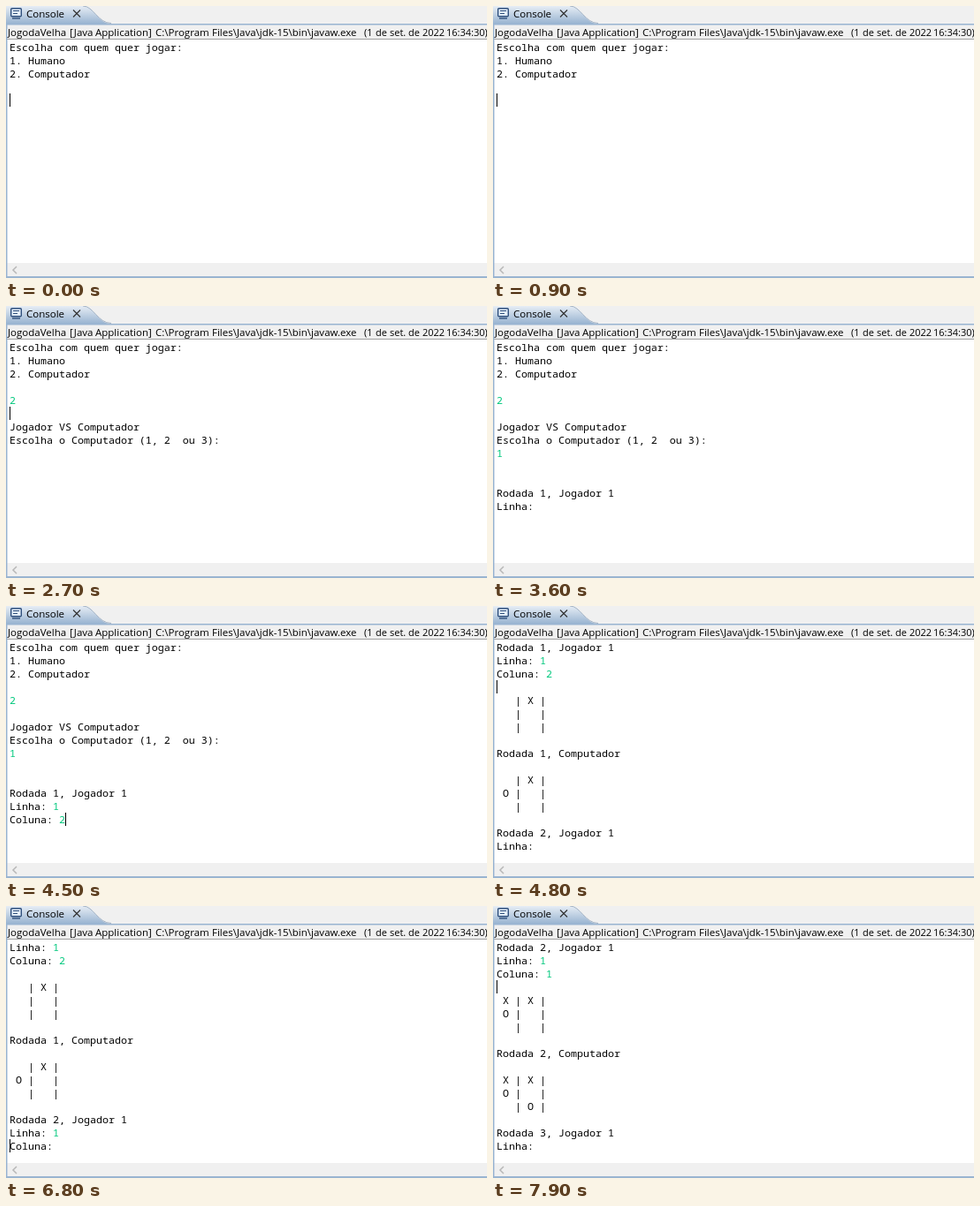
Write an HTML page that moves like this. It is 544 px wide and 308 px high and loops after 8000 ms.

```html
<!DOCTYPE html>
<html lang="pt-BR">
<head>
<meta charset="utf-8">
<title>Console</title>
<style>
  html, body { margin: 0; width: 100%; height: 100%; overflow: hidden; background: #fff; }
  svg { display: block; width: 544px; height: 308px; }
  text { white-space: pre; fill: #000; }
  .ui { font-family: "Open Sans", "Noto Sans", sans-serif; font-size: 11.5px; }
  .date { font-size: 11px; }
  .log { font-family: "Noto Sans Mono", "DejaVu Sans Mono", monospace; font-size: 11.667px; }
  .typed { fill: #00c87d; }
</style>
</head>
<body>
<svg viewBox="0 0 544 308" xmlns="http://www.w3.org/2000/svg">
  <defs>
    <linearGradient id="tab" x1="0" y1="0" x2="0" y2="1">
      <stop offset="0" stop-color="#e6edf5"/>
      <stop offset="1" stop-color="#99b4d1"/>
    </linearGradient>
  </defs>

  <rect width="544" height="308" fill="#fff"/>
  <rect width="544" height="38" fill="#f0f0f0"/>
  <path d="M0 0H87C99 0 104 20 119 20H0Z" fill="url(#tab)"/>
  <path d="M87 0C99 0 104 19.5 119 19.5" fill="none" stroke="#a3b3c6"/>
  <rect y="20" width="544" height="1.5" fill="#99b4d1"/>
  <rect y="37" width="544" height="1" fill="#a0a0a0"/>

  <g stroke="#2f4f7c" fill="none">
    <rect x="5.7" y="2.7" width="11.6" height="9.1" rx="1" fill="#e3eefa" stroke-width="1.4"/>
    <path d="M8 5.5H15M8 8.5H13"/>
    <path d="M7 14H16" stroke-width="1.4"/>
  </g>
  <text class="ui" x="23" y="13">Console</text>
  <path d="M76 4.5L84 12.5M84 4.5L76 12.5" stroke="#333" stroke-width="1.2"/>

  <text class="ui" y="34" id="title"></text>

  <g id="log"></g>
  <rect id="caret" width="1" height="15" fill="#000"/>

  <rect y="291" width="544" height="15" fill="#f0f0f0"/>
  <path d="M12 295L8 299L12 303" fill="none" stroke="#b8b8b8" stroke-width="1.5"/>
  <rect y="21" width="1.5" height="287" fill="#99b4d1"/>
  <rect y="306" width="544" height="2" fill="#99b4d1"/>
</svg>

<script>
const NS = 'http://www.w3.org/2000/svg';
const LOOP = 8000, ROWS = 16, LEFT = 4, CHAR = 7, LINE = 15, BASE = 51;

const byId = id => document.getElementById(id);
function add(parent, tag, attrs = {}, text = '') {
  const el = document.createElementNS(NS, tag);
  for (const key in attrs) el.setAttribute(key, attrs[key]);
  el.textContent = text;
  return parent.appendChild(el);
}

const words = (list, cls) => list.forEach(([x, word]) =>
  add(byId('title'), 'tspan', { x, class: cls }, word));
words([[2, 'JogodaVelha'], [72, '[Java'], [101, 'Application]'],
  [169, 'C:\\Program'], [233, 'Files\\Java\\jdk-15\\bin\\javaw.exe']], 'path');
words([[405, '(1'], [418, 'de'], [434, 'set.'], [455, 'de'],
  [471, '2022'], [498, '16:34:30)']], 'date');

// Board cells are given as nine characters, row by row
const board = cells => [0, 3, 6].map(i =>
  ` ${cells[i]} | ${cells[i + 1]} | ${cells[i + 2]}`.trimEnd() + '\n').join('');
const turn = n => `Rodada ${n}, Jogador 1\nLinha: `;
const round = (n, mine, reply) =>
  `\n${board(mine)}\nRodada ${n}, Computador\n\n${board(reply)}\n${turn(n + 1)}`;

// Console session: time, stream, text
const session = [
  [0, 'out', 'Escolha com quem quer jogar:\n1. Humano\n2. Computador\n\n'],
  [0, 'in', ''],
  [1300, 'in', '2'],
  [1700, 'in', '\n'],
  [2000, 'out', '\nJogador VS Computador\nEscolha o Computador (1, 2  ou 3):\n'],
  [2800, 'in', '1'],
  [3000, 'in', '\n'],
  [3000, 'out', '\n\n' + turn(1)],
  [3800, 'in', '1'],
  [4000, 'in', '\n'],
  [4000, 'out', 'Coluna: '],
  [4400, 'in', '2'],
  [4600, 'in', '\n'],
  [4600, 'out', round(1, ' X       ', ' X O     ')],
  [6600, 'in', '1'],
  [6700, 'in', '\n'],
  [6700, 'out', 'Coluna: '],
  [7100, 'in', '1'],
  [7300, 'in', '\n'],
  [7300, 'out', round(2, 'XX O     ', 'XX O   O ')]
];

const rows = Array.from({ length: ROWS }, (_, i) => {
  const el = add(byId('log'), 'text', { class: 'log', x: LEFT, y: BASE + i * LINE });
  return { out: add(el, 'tspan'), in: add(el, 'tspan', { class: 'typed' }) };
});

function replay(time) {
  const lines = [{ out: '', in: '' }];
  let row = 0, col = 0;
  for (const [at, stream, text] of session) {
    if (at > time) break;
    text.split('\n').forEach((part, i) => {
      if (i) lines.push({ out: '', in: '' });
      lines[lines.length - 1][stream] += part;
    });
    if (stream === 'in') {
      const last = lines[lines.length - 1];
      row = lines.length - 1;
      col = last.out.length + last.in.length;
    }
  }
  return { lines, row, col };
}

function draw(time) {
  const { lines, row, col } = replay(time);
  const top = Math.max(0, lines.length - ROWS);
  rows.forEach((el, i) => {
    const line = lines[top + i] || { out: '', in: '' };
    for (const stream of ['out', 'in'])
      if (el[stream].textContent !== line[stream]) el[stream].textContent = line[stream];
  });
  const caret = byId('caret');
  caret.setAttribute('x', LEFT + col * CHAR);
  caret.setAttribute('y', BASE - 12 + (row - top) * LINE);
  caret.setAttribute('visibility', time >= 3400 && time < 3800 ? 'hidden' : 'visible');
}

const start = performance.now();
function tick() {
  draw((performance.now() - start) % LOOP);
  requestAnimationFrame(tick);
}
tick();
</script>
</body>
</html>
```
